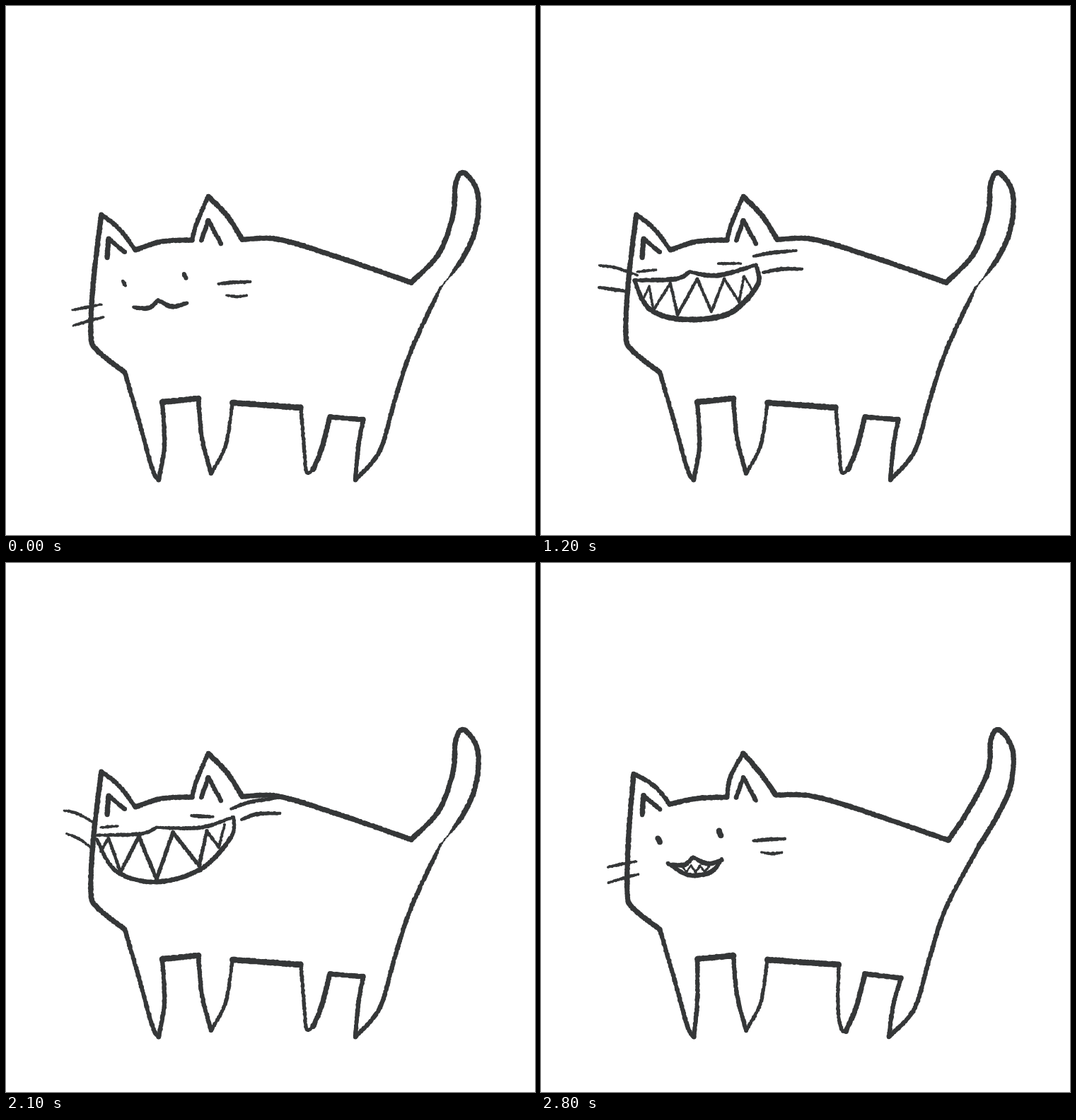
An HTML page with a canvas that plays this animation: 748 px wide and 748 px high, repeating every 2.9 s.

```html
<!DOCTYPE html>
<html lang="en">
<head>
<meta charset="utf-8">
<title>Grinning cat</title>
<style>
html, body { margin: 0; width: 100%; height: 100%; overflow: hidden; background: #fff; }
canvas { display: block; width: 748px; height: 748px; }
</style>
</head>
<body>
<canvas id="stage" width="748" height="748"></canvas>
<script>
const ctx = document.getElementById('stage').getContext('2d');
const STEP = 100, STEPS = 29, TURN = 18;

// "width: x y, x y"; each outline stroke starts where the one before ended.
const outline = `
7: 135 295, 124 385, 120 465, 130 488, 168 518
6: 189 590, 207 655, 216 670
6: 224 620, 221 560
8: 272 555
6: 277 610, 290 661
5: 311 620, 320 561
8: 417 568
5: 422 630, 425 659, 434 656
7: 446 627, 458 581
7: 505 585
6: 498 625, 494 670
6: 528 630, 549 560, 573 487, 614 399
7: 645 358, 664 315, 667 265, 648 236, 636 250, 632 295, 612 350, 573 391
7: 460 352, 385 330, 334 330
7: 313 297, 286 269
6: 270 306, 263 331
7: 220 333, 183 345
6: 160 315, 135 295`;

// Redrawn poses: "point dx dy".
const poses = ['',
  `0 1 7, 3 0 -3, 10 3 0, 15 6 1, 16 3 0, 17 4 2, 18 0 8, 20 -3 1, 22 -3 8, 23 -4 -2, 24 -4 0,
   25 -3 0, 26 -3 -2, 28 2 4, 29 -3 2, 31 3 -4, 33 3 0, 34 -7 0, 37 0 6, 38 -4 -5, 42 -2 6, 43 0 5`,
  `0 -4 3, 2 2 0, 8 -3 0, 15 4 0, 16 -2 0, 18 -3 6, 21 4 2, 23 -2 0, 27 6 0, 34 -8 0, 35 3 1,
   38 -2 -2, 39 -3 0, 41 -2 -4, 44 -1 -4`];

const ears = `
7: 143 356, 145 329
6: 145 329, 168 348
6: 276 332, 286 303
6: 286 303, 304 336`;

const whiskers = `
4: 94 430, 113 426, 135 422
4: 95 452, 115 446, 138 440
5: 300 393, 320 391, 345 390
4: 312 409, 327 411, 341 409`;

const smile = `
6: 180 426, 202 427, 215 416
6: 215 416, 235 425, 256 420`;

const jaw = `
6: 179 424, 208 441, 240 437, 256 418`;

const grin = `
4: 136 376, 163 373
4: 250 364, 283 364
4: 82 367, 105 370, 137 381
5: 82 398, 118 403
5: 301 354, 325 349, 361 346
5: 314 377, 340 372, 369 372
6: 132 388, 190 386, 210 376
6: 210 376, 250 381, 304 366
7: 132 388, 153 428, 200 443, 265 435, 306 395, 304 366
z4: 146 412, 153 396, 159 430, 183 392, 193 437, 221 386, 241 432, 259 386, 280 418, 287 382, 299 402`;

const wideGrin = `
4: 134 374, 158 372
5: 262 357, 293 359
4: 82 350, 100 354, 124 367
4: 86 383, 103 390, 121 403
5: 318 348, 345 338, 386 332
5: 333 363, 355 355, 388 354
5: 129 385, 190 383, 213 374
5: 213 374, 275 374, 322 359
6: 128 390, 155 435, 210 451, 275 433, 318 388, 322 359
z5: 134 408, 145 389, 162 437, 188 387, 213 447, 236 381, 273 428, 284 379, 301 402, 309 370`;

const triples = text => text.split(',').map(p => p.trim().split(/\s+/).map(Number));

const parse = text => text.trim().split('\n').map(line => {
  const [head, body] = line.split(':');
  return { sharp: head[0] === 'z', width: +head.replace('z', ''), pts: triples(body) };
});

function buildBody(moves) {
  const strokes = parse(outline);
  const all = strokes.flatMap(s => s.pts);
  if (moves) {
    for (const [i, dx, dy] of triples(moves)) {
      all[i][0] += dx;
      all[i][1] += dy;
    }
  }
  all[all.length - 1] = strokes[strokes.length - 1].pts[1] = all[0];
  strokes.forEach((s, i) => {
    if (i) s.pts = [strokes[i - 1].pts.at(-1), ...s.pts];
  });
  return strokes;
}

const bodies = poses.map(buildBody);

function random(seed) {
  return () => (seed = (seed * 16807) % 2147483647) / 2147483647;
}

function spline(a, b, c, d, t) {
  return b + t / 2 * (c - a + t * (2 * a - 5 * b + 4 * c - d + t * (3 * (b - c) + d - a)));
}

// Stamps slightly uneven dots along the stroke for a dry-ink edge.
function brush({ pts, sharp, width }, rnd, pressure) {
  const last = pts.length - 1;
  ctx.beginPath();
  for (let i = 0; i < last; i++) {
    const b = pts[i], c = pts[i + 1];
    const a = pts[Math.max(i - 1, 0)], d = pts[Math.min(i + 2, last)];
    const n = Math.ceil(Math.hypot(c[0] - b[0], c[1] - b[1]) / 1.2);
    for (let k = 0; k <= n; k++) {
      const t = k / n;
      const [x, y] = b.map((v, j) => sharp ? v + (c[j] - v) * t : spline(a[j], v, c[j], d[j], t));
      const w = width * pressure((i + t) / last, x, y);
      const r = Math.max(0.6, w / 2 + rnd() * 0.8 - 0.4);
      const px = x + rnd() * 0.8 - 0.4, py = y + rnd() * 0.8 - 0.4;
      ctx.moveTo(px + r, py);
      ctx.arc(px, py, r, 0, 7);
    }
  }
  ctx.fill();
}

const even = () => 1;
const taper = u => 0.75 + 0.35 * Math.sin(Math.PI * u);
// The line almost runs dry below the tail.
const dry = (u, x, y) => 1 - 0.7 * Math.exp(-((x - 621) ** 2 + (y - 389) ** 2) / 450);

const draw = (text, rnd, pressure = taper) => parse(text).forEach(s => brush(s, rnd, pressure));

function eye(x, y, size, rnd) {
  brush({ pts: [[x - 1.5, y - 3], [x + 1.5, y + 3]], width: size }, rnd, even);
}

function smallTeeth(rnd) {
  const pts = Array.from({ length: 7 }, (_, i) => [199 + 6.5 * i, i % 2 ? 437 : 428]);
  brush({ pts, width: 3, sharp: true }, rnd, even);
}

function render(step) {
  const pos = step <= TURN ? step : 2 * TURN - step;
  const v = pos % 3, rnd = random(v * 977 + 131);
  ctx.fillStyle = '#fff';
  ctx.fillRect(0, 0, 748, 748);
  ctx.fillStyle = '#353738';
  bodies[v].forEach(s => brush(s, rnd, v ? even : dry));
  draw(ears, rnd, even);
  if (pos < 9) {
    eye(167, 392, 5 + v * 1.3, rnd);
    eye(253 + v % 2 * 2, 382, 6 + v, rnd);
    draw(whiskers, rnd);
    draw(smile, rnd);
    if (pos >= 6) {
      draw(jaw, rnd);
      smallTeeth(rnd);
    }
  } else {
    draw(pos < 15 ? grin : wideGrin, rnd);
  }
}

let shown = -1;
function tick() {
  const step = Math.floor(performance.now() / STEP) % STEPS;
  if (step !== shown) render(shown = step);
  requestAnimationFrame(tick);
}
tick();
</script>
</body>
</html>
```
